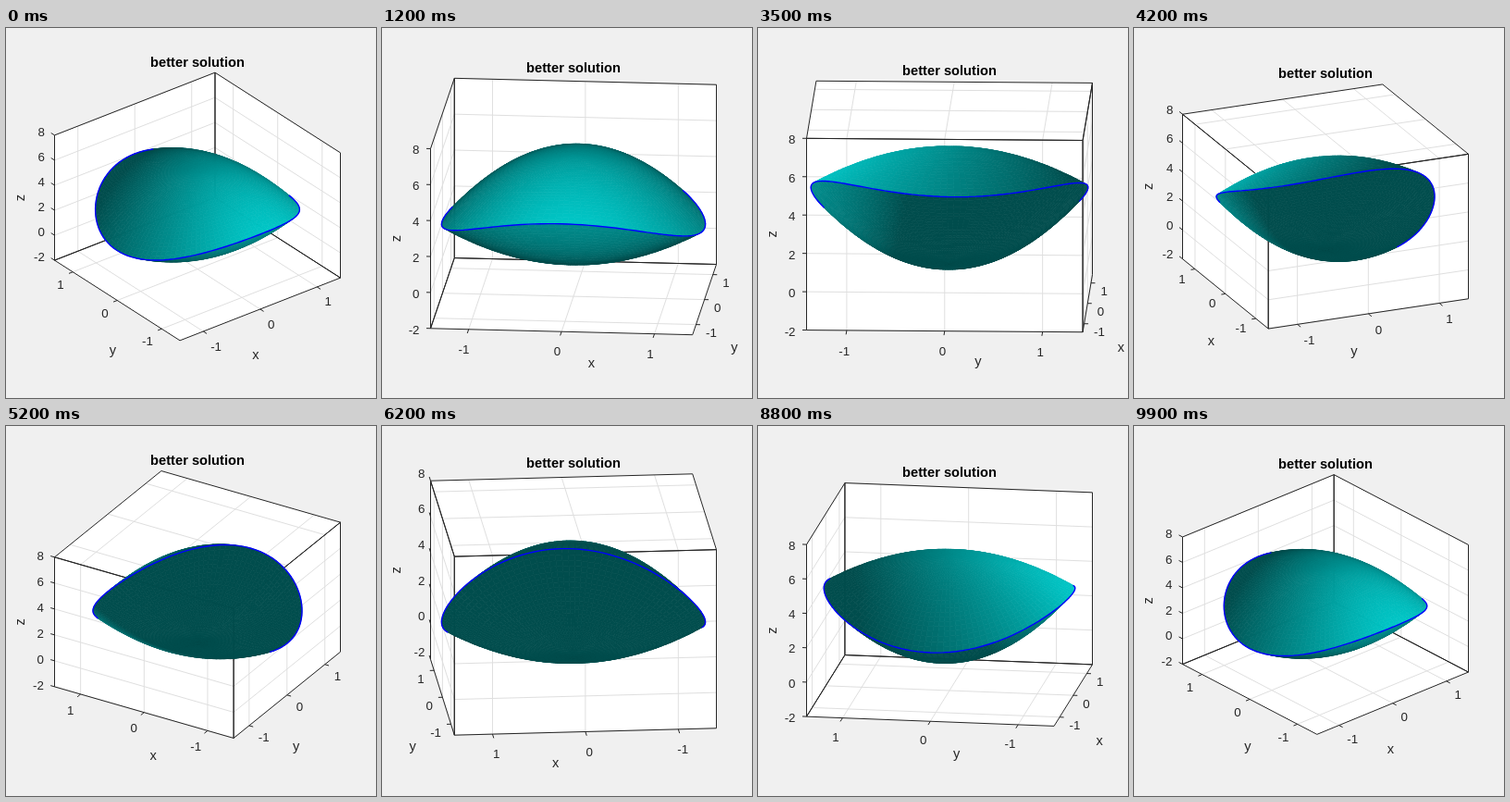
These frames come from a looping animation (400x400 px, 10000 ms). An HTML page with a canvas:

```html
<!DOCTYPE html>
<html>
<head>
<meta charset="utf-8">
<style>
html, body { margin: 0; width: 100%; height: 100%; overflow: hidden; background: #f0f0f0; }
canvas { display: block; }
</style>
</head>
<body>
<canvas id="stage" width="400" height="400"></canvas>
<script>
const ctx = document.getElementById('stage').getContext('2d');
const CX = 207, CY = 193, SPAN = 309;
const R = 1.41, RIM = Math.SQRT2, ZMIN = -2, ZMAX = 8;
const INK = '#262626', GRID = '#dfdfdf', FONT = '"Liberation Sans", Arial, sans-serif';
const LIGHT = [0.1, -0.9, 0.4];
const RINGS = 30, SECTORS = 120;
const TICKS = [-1, 0, 1], ZTICKS = [-2, 0, 2, 4, 6, 8];

// The solid lies between z = x² + 2y² and z = 6 - 2x² - y².
const upper = {
  z: (x, y) => 6 - 2 * x * x - y * y,
  normal: (x, y) => [0.8 * x, 0.4 * y, 1]
};
const lower = {
  z: (x, y) => x * x + 2 * y * y,
  normal: (x, y) => [0.4 * x, 0.8 * y, -1]
};

let sinA, cosA, sinE, cosE, unit, eye;

function setView(step) {
  const az = (-38 + 3.6 * step) * Math.PI / 180;
  const el = (step <= 50 ? 30 - 1.2 * step : -30 + 1.2 * (step - 51)) * Math.PI / 180;
  sinA = Math.sin(az); cosA = Math.cos(az);
  sinE = Math.sin(el); cosE = Math.cos(el);
  if (Math.abs(sinE) < 1e-9) sinE = 0;
  unit = SPAN / (Math.abs(sinA) + Math.abs(cosA)) / (2 * R);
  eye = [sinA * cosE, -cosA * cosE, sinE];
}

const dot = (a, b) => a[0] * b[0] + a[1] * b[1] + a[2] * b[2];
const depth = ([x, y]) => cosA * y - sinA * x;
const project = (x, y, z) => [
  CX + unit * (x * cosA + y * sinA),
  CY - unit * ((z - 3) / 5 * cosE + depth([x, y]) * sinE)
];

function path(points, close) {
  ctx.beginPath();
  points.forEach(p => ctx.lineTo(p[0], p[1]));
  if (close) ctx.closePath();
}

function line(a, b, color) {
  path([a, b]);
  ctx.strokeStyle = color;
  ctx.stroke();
}

function text(str, x, y, font, color = INK) {
  ctx.font = font + ' ' + FONT;
  ctx.fillStyle = color;
  ctx.fillText(str, x, y);
}

function drawBox(back, base) {
  const [bx, by] = back;
  const faces = [
    [[bx, -R, ZMIN], [bx, R, ZMIN], [bx, R, ZMAX], [bx, -R, ZMAX]],
    [[-R, by, ZMIN], [R, by, ZMIN], [R, by, ZMAX], [-R, by, ZMAX]],
    [[-R, -R, base], [R, -R, base], [R, R, base], [-R, R, base]]
  ].map(face => face.map(p => project(...p)));
  const seg = (a, b) => line(project(...a), project(...b), GRID);

  ctx.lineWidth = 1;
  ctx.fillStyle = '#fff';
  for (const face of faces) { path(face, true); ctx.fill(); }
  for (const t of TICKS) {
    seg([t, -R, base], [t, R, base]);
    seg([-R, t, base], [R, t, base]);
    seg([t, by, ZMIN], [t, by, ZMAX]);
    seg([bx, t, ZMIN], [bx, t, ZMAX]);
  }
  for (const z of ZTICKS) {
    seg([-R, by, z], [R, by, z]);
    seg([bx, -R, z], [bx, R, z]);
  }
  ctx.strokeStyle = INK;
  for (const face of faces) { path(face, true); ctx.stroke(); }
}

const polar = (i, j) => {
  const r = RIM * i / RINGS, a = 2 * Math.PI * j / SECTORS;
  return [r * Math.cos(a), r * Math.sin(a)];
};

// The solid is convex, so dropping faces turned away is enough.
function drawSurface(surf) {
  const at = (i, j) => {
    const [x, y] = polar(i, j);
    return project(x, y, surf.z(x, y));
  };
  ctx.lineWidth = 0.7;
  for (let i = 0; i < RINGS; i++) {
    for (let j = 0; j < SECTORS; j++) {
      const n = surf.normal(...polar(i + 0.5, j + 0.5));
      if (dot(n, eye) <= 0) continue;
      const lit = Math.max(0, dot(n, LIGHT) / Math.hypot(...n));
      const v = Math.round(255 * (0.3 + 0.6 * lit));
      ctx.fillStyle = ctx.strokeStyle = `rgb(0,${v},${v})`;
      path([at(i, j), at(i + 1, j), at(i + 1, j + 1), at(i, j + 1)], true);
      ctx.fill();
      ctx.stroke();
    }
  }
}

function drawRim() {
  const at = j => {
    const [x, y] = polar(RINGS, j);
    return project(x, y, lower.z(x, y));
  };
  ctx.beginPath();
  for (let j = 0; j < SECTORS; j++) {
    const mid = polar(RINGS, j + 0.5);
    if (![upper, lower].some(s => dot(s.normal(...mid), eye) > 0)) continue;
    ctx.moveTo(...at(j));
    ctx.lineTo(...at(j + 1));
  }
  ctx.lineWidth = 1.4;
  ctx.lineCap = 'round';
  ctx.strokeStyle = '#00f';
  ctx.stroke();
  ctx.lineCap = 'butt';
}

function direction(from, to) {
  const dx = to[0] - from[0], dy = to[1] - from[1], len = Math.hypot(dx, dy) || 1;
  return [dx / len, dy / len];
}

function tick(p, d) {
  line(p, [p[0] + 4.5 * d[0], p[1] + 4.5 * d[1]], INK);
}

// A floor axis runs along one side of the lowest corner; ticks follow the other side.
function drawFloorAxis(name, low) {
  const [lx, ly] = low, isX = name === 'x';
  const along = t => isX ? project(t, ly, ZMIN) : project(lx, t, ZMIN);
  const corner = project(lx, ly, ZMIN);
  const inner = isX ? project(lx, -ly, ZMIN) : project(-lx, ly, ZMIN);
  const d = direction(inner, corner);
  for (const t of TICKS) {
    const p = along(t);
    tick(p, d);
    ctx.font = '13.33px ' + FONT;
    const half = ctx.measureText(t).width / 2;
    text(t, p[0] + d[0] * (10.5 + half), p[1] + 13 + 14 * d[1], '13.33px');
  }
  const mid = along(0);
  const drop = Math.abs(along(R)[1] - along(-R)[1]);
  text(name, mid[0] + 0.25 * (corner[0] - CX), mid[1] + 37 + 0.25 * drop, '14.67px');
}

function drawHeightAxis(left, low) {
  const d = direction(project(...low, ZMIN), project(...left, ZMIN));
  ctx.textAlign = 'right';
  for (const z of ZTICKS) {
    const p = project(...left, z);
    tick(p, d);
    text(z, p[0] - 3.5 + 8.5 * d[0], p[1] + 6 + 10 * d[1], '13.33px');
  }
  ctx.textAlign = 'center';
  ctx.save();
  ctx.translate(20, project(...left, 3)[1]);
  ctx.rotate(-Math.PI / 2);
  text('z', 0, 0, '14.67px');
  ctx.restore();
}

function draw(step) {
  setView(step);
  const corners = [[-R, -R], [R, -R], [R, R], [-R, R]];
  const byDepth = corners.slice().sort((a, b) => depth(a) - depth(b));
  const near = byDepth[0], back = byDepth[3];
  const above = sinE >= 0;
  const low = above ? near : back;
  const left = corners.reduce((a, b) => project(...b, 0)[0] < project(...a, 0)[0] ? b : a);
  const high = project(...(above ? back : near), ZMAX);

  ctx.fillStyle = '#f0f0f0';
  ctx.fillRect(0, 0, 400, 400);
  ctx.lineJoin = 'round';
  ctx.textAlign = 'center';
  drawBox(back, above ? ZMIN : ZMAX);
  drawSurface(lower);
  drawSurface(upper);
  drawRim();
  ctx.lineWidth = 1;
  drawFloorAxis('x', low);
  drawFloorAxis('y', low);
  drawHeightAxis(left, low);
  text('better solution', CX, Math.round(high[1] - 6.5), 'bold 14.67px', '#000');
}

let shown = -1;
function frame() {
  const step = Math.floor(performance.now() / 100) % 100;
  if (step !== shown) draw(shown = step);
  requestAnimationFrame(frame);
}
frame();
</script>
</body>
</html>
```
